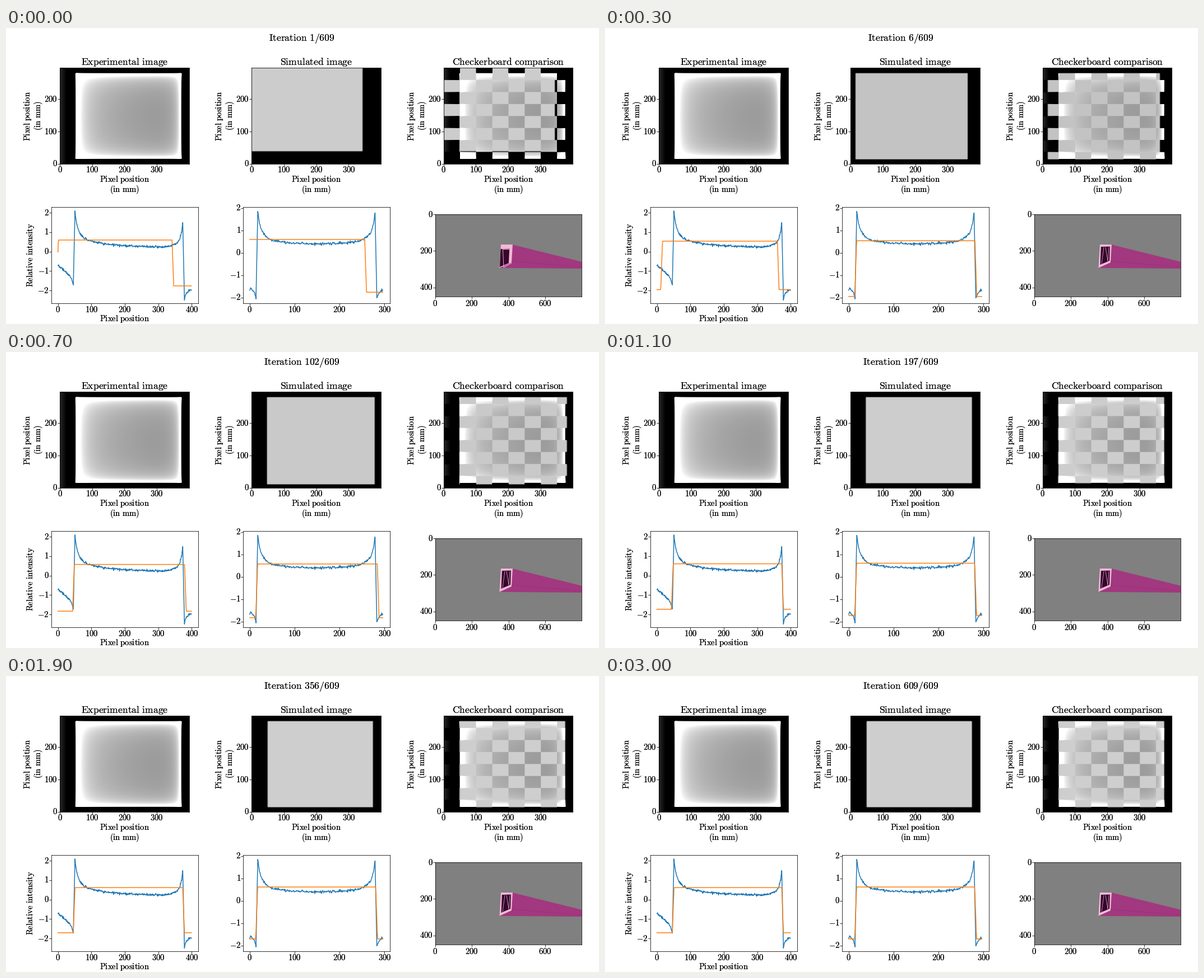
Recreate the animation shown at these times as a matplotlib script. Size 1058 px wide and 529 px high, loop 4.6 s.

```python
import numpy as np
import matplotlib.pyplot as plt
from matplotlib.animation import FuncAnimation
from matplotlib.patches import Polygon

W, H, DPI = 1058, 529, 64
PX = 72 / DPI                     # points per pixel
SMALL, BIG = 14.7, 17.64          # text sizes in pixels
LINE = 1.5 * PX
STEP = 342.4                      # distance between columns
BLUE, ORANGE = "#1f77b4", "#ff7f0e"
PINK, DARK, BEAM, CREASE = "#f2b8d8", "#35072c", "#a2387f", "#962f75"

plt.rcParams["mathtext.fontset"] = "cm"
fig = plt.figure(figsize=(W / DPI, H / DPI), dpi=DPI, facecolor="white")


def roman(s):
    return r"$\mathrm{" + s.replace(" ", r"\ ") + "}$"


def put(x, y, s, size=SMALL, rot=0, ha="center"):
    """Text centred on a pixel position, laid down twice for a darker print."""
    return [fig.text(x / W, 1 - y / H, roman(s), fontsize=size * PX,
                     rotation=rot, ha=ha, va="center", color="black")
            for _ in range(2)]


def make_axes(x0, y0, x1, y1, xlim, ylim, xticks, yticks, drop=11):
    """Axes given in pixels; ticks map a label to its data position."""
    ax = fig.add_axes([x0 / W, 1 - y1 / H, (x1 - x0) / W, (y1 - y0) / H])
    ax.set(xlim=xlim, ylim=ylim, xticks=list(xticks.values()),
           yticks=list(yticks.values()))
    ax.tick_params(length=3.8 * PX, width=0.8 * PX,
                   labelbottom=False, labelleft=False)
    for s in ax.spines.values():
        s.set_linewidth(0.8 * PX)
    for s, v in xticks.items():
        put(x0 + (v - xlim[0]) / (xlim[1] - xlim[0]) * (x1 - x0), y1 + drop, s)
    for s, v in yticks.items():
        put(x0 - 4.5, y1 - (v - ylim[0]) / (ylim[1] - ylim[0]) * (y1 - y0),
            s, ha="right")
    return ax


def ticks(start, stop, step=100, scale=1, origin=0):
    return {str(v): origin + v * scale for v in range(start, stop + 1, step)}


# Measured profiles across and down the detector
NX, NY = 400, 297
x, y = np.arange(NX), np.arange(NY)


def glow(depth, height, reach):
    """Bright rim: a sharp peak on a longer tail."""
    d = np.maximum(depth, 0)
    return height * (0.6 * np.exp(-2 * d / reach) + 0.4 * np.exp(-d / (2 * reach)))


def join(u, before, plate, after, cuts):
    """Three pieces joined by straight flanks."""
    a, b, c, d = cuts
    v = np.where(u <= a, before, np.where(u <= c, plate, after))
    keep = (u <= a) | ((u >= b) & (u <= c)) | (u >= d)
    return np.interp(u, u[keep], v[keep])


across = join(
    x, -0.7 - 0.0145 * x - 0.35 * np.exp((x - 46) / 5),
    0.14 + 0.44 * np.exp(-(x - 51) / 150) + glow(x - 51, 1.5, 12)
    + glow(373 - x, 1.33, 10),
    -1.95 - 0.48 * np.exp(-(x - 378) / 6), (46, 51, 373, 378))
down = join(
    y, -1.57 - 0.45 * np.exp((y - 14) / 5),
    0.4 + 0.1 * ((y - 150) / 130) ** 2 + glow(y - 18, 1.35, 11)
    + glow(279 - y, 1.32, 10),
    -1.62 - 0.43 * np.exp(-(y - 283) / 6), (14, 18, 279, 283))

on_plate = np.outer((y > 15) & (y < 282), (x > 47) & (x < 378))
measured = np.where(on_plate, across + (down - 0.42)[:, None],
                    np.where(x < 48, across, -2))
tile = ((y * 8 // NY)[:, None] + (x * 8 // NX)) % 2 == 1


def window(u, a, b, width):
    return (np.clip((u - a) / width + 0.5, 0, 1)
            * np.clip((b - u) / width + 0.5, 0, 1))


def simulate(k):
    """Plate shadow, scaled to zero mean and unit deviation."""
    def settle(*v):
        return np.interp(k, (0, 3, 7, 11), v)
    wh = window(x, settle(-1.2, 14, 46.5, 46) + 2.5 * np.clip((k - 11) / 8, 0, 1),
                settle(343.5, 362.5, 381, 375.5), 5)
    wv = window(y, settle(-4, 15.5, 15.5, 15.5), settle(258, 283, 286, 282.5), 4)
    p = wh.mean() * wv.mean()
    hi = 1.025 * np.sqrt((1 - p) / p)
    lo = -1.05 / hi
    return [lo + (hi - lo) * w for w in (np.outer(wv, wh), wh, wv)]


# Top row: images
pictures = []
for i, name in enumerate(["Experimental image", "Simulated image",
                          "Checkerboard comparison"]):
    dx = i * STEP
    ax = make_axes(96 + dx, 71.3, 326.6 + dx, 243, (0, NX), (0, NY),
                   ticks(0, 300), ticks(0, 200))
    pictures.append(ax.imshow(measured, cmap="gray", vmin=-1, vmax=1,
                              extent=(0, NX, 0, NY), aspect="auto"))
    mid = 211.3 + dx
    put(mid, 61, name, BIG)
    put(mid, 271, "Pixel position")
    put(mid, 289, "(in mm)")
    put(39 + dx, 157, "Pixel position", rot=90)
    put(58 + dx, 157, "(in mm)", rot=90)

# Bottom row: profiles
rng = np.random.default_rng(4)
axh = make_axes(81, 320.2, 342.5, 492, (-19.5, 418.5), (-2.66, 2.285),
                ticks(0, 400), ticks(-2, 2, 1))
axv = make_axes(423.4, 320.2, 684.9, 492, (-14.2, 312), (-2.26, 2.04),
                ticks(0, 300), ticks(-2, 2, 1))
axh.plot(x, across + rng.normal(0, 0.03, NX), color=BLUE, lw=LINE)
axv.plot(y, down + rng.normal(0, 0.03, NY), color=BLUE, lw=LINE)
fit_h, = axh.plot(x, across, color=ORANGE, lw=LINE)
fit_v, = axv.plot(y, down, color=ORANGE, lw=LINE)
put(211.3, 520, "Pixel position")
put(44, 406, "Relative intensity", rot=90)

# Bottom right: 3D view, drawn in stage pixels
X0, Y0, X1, Y1 = 765.8, 333, 1027.3, 479.7
scale = (X1 - X0) / 800
view = make_axes(X0, Y0, X1, Y1, (X0, X1), (Y1, Y0),
                 ticks(0, 600, 200, scale, X0), ticks(0, 400, 200, scale, Y0),
                 drop=12.5)
view.set_facecolor("#808080")


def shape(points, color):
    return view.add_patch(Polygon(points, closed=True, fc=color, ec="none"))


def stroke(points, color, width):
    px, py = zip(*points)
    return view.plot(px, py, color=color, lw=width * PX)[0]


shape([(903, 387), (1028, 418), (1028, 430), (881, 428.8), (902, 419)], BEAM)
stroke([(902, 417), (1028, 427)], CREASE, 0.6)
shape([(883, 387), (904, 387), (902, 419), (880.5, 428.7)], PINK)
opening = np.array([(885, 391), (901, 390.5), (900, 416), (883.5, 423)])
inner = shape(opening, DARK)
streaks = [stroke(p, PINK, 0.7) for p in (
    [(890, 392), (886, 421)], [(893, 392), (897, 416)], [(899, 392), (897, 416)])]
cage = [stroke(p, PINK, 0.9) for p in (
    [(886.5, 395.5), (898.5, 395.5), (897.5, 420)],
    [(886.5, 395.5), (888, 428), (902, 420)])]

head = put(528, 19, "Iteration 1/609", BIG)


def update(i):
    k = min(i, 30)
    sim, row, column = simulate(k)
    pictures[1].set_data(sim)
    pictures[2].set_data(np.where(tile, sim, measured))
    fit_h.set_ydata(row)
    fit_v.set_ydata(column)
    shift = max(0, 1 - k / 3)
    inner.set_xy(opening + shift * np.array([-2.5, 4]))
    for line in cage:
        line.set_visible(shift > 0.5)
    for line in streaks:
        line.set_visible(shift <= 0.5)
    n = np.interp(k, (0, 3, 7, 11, 15, 23, 30), (1, 6, 102, 197, 273, 439, 609))
    for t in head:
        t.set_text(roman(f"Iteration {round(n)}/609"))


anim = FuncAnimation(fig, update, frames=46, interval=100, init_func=lambda: update(0),
                     repeat=True, repeat_delay=0, blit=False)
plt.show()
```
